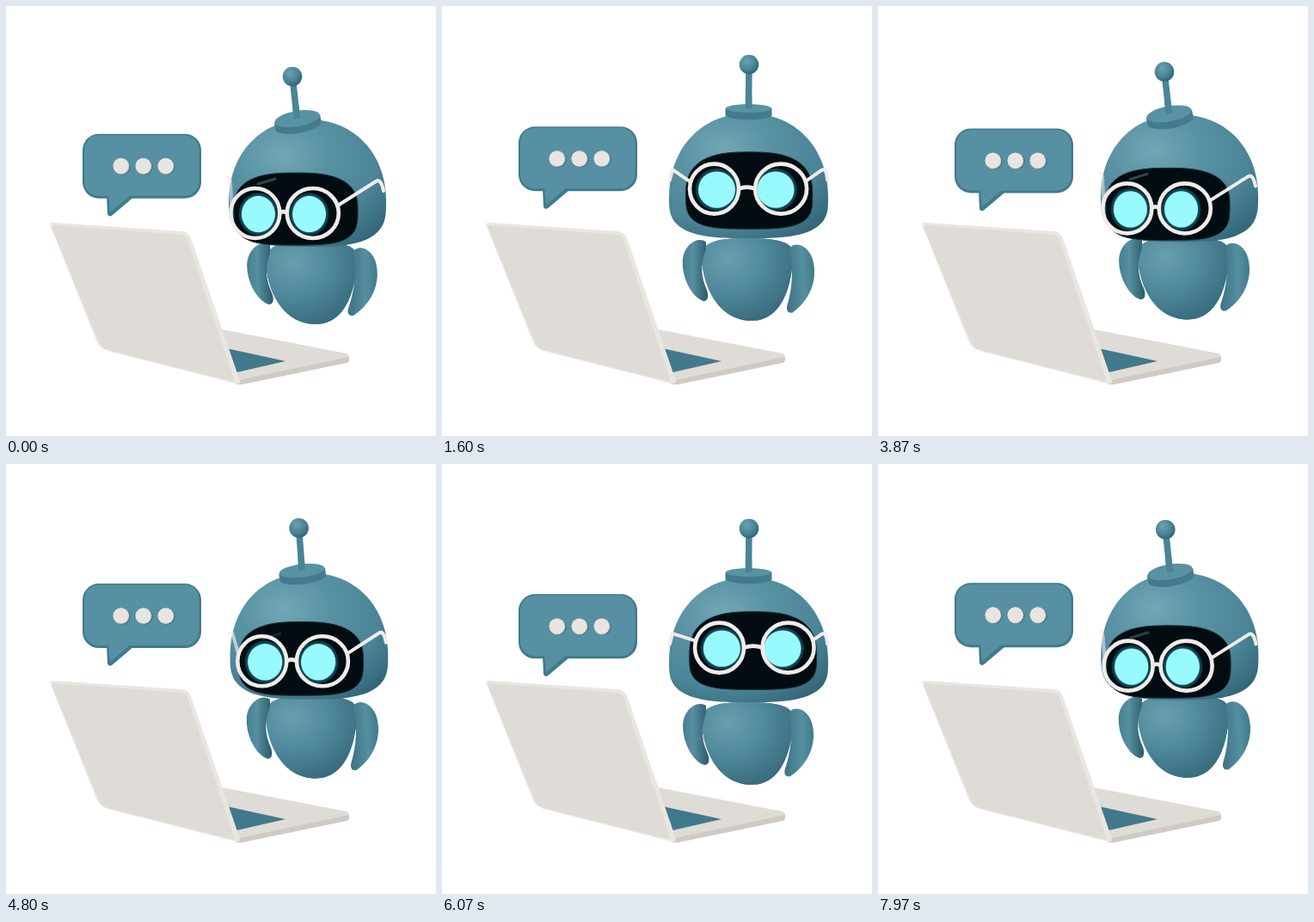
An HTML page for the animation above (8.01 s loop, 500 px wide and 500 px high).

```html
<!DOCTYPE html>
<html lang="en">
<head>
<meta charset="utf-8">
<title>Robot with laptop</title>
<style>
  html, body { margin: 0; width: 100%; height: 100%; overflow: hidden; background: #fff; }
  svg { display: block; width: 100vw; height: 100vh; }
  .frame { fill: none; stroke: #efecea; stroke-width: 4.6; stroke-linecap: round; stroke-linejoin: round; }
  .thin { stroke-width: 4; }
</style>
</head>
<body>
<svg viewBox="0 0 500 500">
  <defs>
    <radialGradient id="skin" cx=".34" cy=".28" r=".85">
      <stop offset="0" stop-color="#72a7b5"/>
      <stop offset=".35" stop-color="#5892a3"/>
      <stop offset=".72" stop-color="#4a8496"/>
      <stop offset="1" stop-color="#346678"/>
    </radialGradient>
    <radialGradient id="belly" cx=".3" cy=".25" r=".8">
      <stop offset="0" stop-color="#699fae"/>
      <stop offset=".5" stop-color="#4f899b"/>
      <stop offset="1" stop-color="#386c7e"/>
    </radialGradient>
    <linearGradient id="neck" x1="0" y1="0" x2="0" y2="1">
      <stop offset="0" stop-color="#173540" stop-opacity=".75"/>
      <stop offset=".16" stop-color="#173540" stop-opacity="0"/>
    </linearGradient>
    <linearGradient id="armL">
      <stop offset="0" stop-color="#467f91"/>
      <stop offset=".4" stop-color="#558fa0"/>
      <stop offset="1" stop-color="#2c5a6a"/>
    </linearGradient>
    <linearGradient id="armR">
      <stop offset="0" stop-color="#3d7284"/>
      <stop offset=".6" stop-color="#558fa0"/>
      <stop offset="1" stop-color="#427a8c"/>
    </linearGradient>
    <radialGradient id="knob" cx=".38" cy=".32" r=".7">
      <stop offset="0" stop-color="#6ba2b1"/>
      <stop offset=".6" stop-color="#4a8496"/>
      <stop offset="1" stop-color="#326476"/>
    </radialGradient>
    <radialGradient id="glow">
      <stop offset=".78" stop-color="#1d6878"/>
      <stop offset="1" stop-color="#0b2a35"/>
    </radialGradient>
  </defs>

  <g id="bubble">
    <g fill="#3f7b8e">
      <rect x="89" y="149" width="138" height="75" rx="19"/>
      <path d="M117 220L118 242Q119 246 123 244L149 222Z"/>
    </g>
    <g fill="#5790a2">
      <rect x="91" y="150.5" width="133.5" height="70.5" rx="17"/>
      <path d="M119 219L121 240L146 219Z"/>
    </g>
    <g id="dots"></g>
  </g>

  <g id="torso">
    <path id="trunk" fill="url(#belly)" d="M302 292C303 277 318 272 355 272C392 272 408 277 408 290C408 318 399 368 360 368C320 368 302 325 302 292Z"/>
    <use href="#trunk" style="fill:url(#neck)"/>
    <path id="shade" fill="url(#neck)" d="M302 292C303 277 318 272 355 272C392 272 408 277 408 290C408 318 399 368 360 368C320 368 302 325 302 292Z"/>
    <path id="left" fill="url(#armL)" d="M307 276C296 269 280 281 280 300C280 321 293 342 305 345C310 345 311 340 309 333C302 317 300 304 307 285Z"/>
    <path id="right" fill="url(#armR)" d="M404 283C410 276 423 279 429 293C437 315 428 343 404 358C398 359 396 354 399 347C405 329 408 309 404 283Z"/>
  </g>

  <g id="head">
    <path id="rod" stroke="#4a8496" stroke-width="7.5"/>
    <circle id="ball" r="11.3" fill="url(#knob)"/>
    <path id="dome" fill="url(#skin)"/>
    <path id="rim" fill="#437b8d"/>
    <ellipse id="top" rx="26.5" fill="#5992a3"/>
    <path id="stub" stroke="#4a8496" stroke-width="7.5"/>
    <path id="visor" fill="#030d11" stroke="#122d36"/>
    <path id="glint" stroke="#4c5a60" stroke-width="3" stroke-linecap="round"/>
    <g id="eyes"></g>
    <path id="side" class="frame thin"/>
    <g id="rings"></g>
    <path id="bridge" class="frame"/>
    <path id="temple" class="frame thin"/>
  </g>

  <g id="laptop">
    <path fill="#dfdbd6" d="M240 374L396 404Q400 406 399 411L272 438L240 424Z"/>
    <path fill="#cfcac4" d="M266 436L399 408V412Q399 414 396 415L275 440Q270 441 266 439Z"/>
    <path fill="#41798c" d="M256 398L325 413L268 426Z"/>
    <path fill="#e9e6e2" d="M51 254Q52 251 57 252L205 262Q212 263 215 270L271 433Q274 440 267 439L118 401Q109 398 106 391Z"/>
    <path fill="#dfdbd7" d="M53 257Q54 255 58 255L203 266Q209 266 211 272L265 433Q266 437 262 436L119 400Q111 398 108 391Z"/>
  </g>
</svg>

<script>
const LOOP = 8010;
const NS = "http://www.w3.org/2000/svg";
const $ = id => document.getElementById(id);
const set = (el, attrs) => { for (const key in attrs) el.setAttribute(key, attrs[key]); };
const add = (parent, tag, attrs) => {
  const el = document.createElementNS(NS, tag);
  set(el, attrs);
  return parent.appendChild(el);
};
const mix = (a, b, k) => a + (b - a) * k;
const clamp = u => Math.max(0, Math.min(1, u));
const smooth = u => u * u * (3 - 2 * u);
const wave = (t, low, period) => -Math.cos((t - low) / period * 2 * Math.PI);

// Superellipse with its own height and roundness above and below the centre.
function blob(x, y, rx, up, down, roundUp, roundDown) {
  const points = [];
  for (let i = 0; i < 120; i++) {
    const a = i / 120 * 2 * Math.PI, c = Math.cos(a), s = Math.sin(a);
    const [h, n] = s < 0 ? [up, roundUp] : [down, roundDown];
    const r = (Math.abs(c) ** n + Math.abs(s) ** n) ** (-1 / n);
    points.push(`${(x + rx * r * c).toFixed(2)} ${(y + h * r * s).toFixed(2)}`);
  }
  return `M${points.join("L")}Z`;
}

// The head swings between the laptop (1) and the viewer (REST), centred on these times.
const REST = -.3, TURN = 1000;
const TURNS = [1375, 3250, 4980, 6600, 8350];
const turnAt = t => TURNS.reduce((k, mid, i) => {
  const dir = i % 2 ? 1 : -1;
  return k + dir * (1 - REST) * smooth(clamp((t - mid) / TURN + .5));
}, 1);

const pair = make => [make(), make()];
const halos = pair(() => add($("eyes"), "ellipse", { fill: "url(#glow)" }));
const lights = pair(() => add($("eyes"), "ellipse", { fill: "#98fafd" }));
const rings = pair(() => add($("rings"), "ellipse", { class: "frame" }));
const dots = [0, 1, 2].map(() => {
  const g = add($("dots"), "g", {});
  add(g, "circle", { cx: 2, cy: -8.5, r: 9.3, fill: "#437a8c" });
  add(g, "circle", { cx: .4, cy: -9.3, r: 9.4, fill: "#d6d1cb" });
  add(g, "circle", { cy: -9.7, r: 8.8, fill: "#e8e5e1" });
  return g;
});

function drawHead(k, bob) {
  const body = clamp(k);
  const turn = (a, b) => mix(a, b, body);
  const face = (x, y, depth = 0) => [x - k * (30 + .13 * (x - 352) + depth), y + k * 25];
  set($("head"), { transform: `translate(0 ${bob - 367 - 2 * body})` });

  const bx = turn(357, 333), by = turn(69, 81);
  const cx = turn(356.5, 338.5), cy = turn(120, 130), ry = turn(5, 9);
  const tilt = `translate(${cx} ${cy}) rotate(${-10 * body})`;
  set($("ball"), { cx: bx, cy: by });
  set($("rod"), { d: `M${bx} ${by}L${cx} ${cy}` });
  set($("stub"), { d: `M${mix(bx, cx, .7)} ${mix(by, cy, .7)}L${cx} ${cy}` });
  set($("top"), { ry, transform: tilt });
  set($("rim"), { d: `M-27 0V8A27 ${ry} 0 0 0 27 8V0Z`, transform: tilt });
  set($("dome"), {
    d: blob(turn(356.5, 350.5), turn(225, 228), turn(92.5, 91.5), turn(99, 97), turn(46, 51), 2.15, 3)
  });
  set($("visor"), {
    d: blob(mix(356, 337, k), mix(222, 236, k), mix(73.5, 72, k), mix(50, 43, k), mix(39, 41, k), 2.7, 3.4)
  });
  set($("glint"), { d: `M${turn(312, 293)} 206l20 -6`, opacity: body * body * .7 });

  const [left, right] = [318, 386].map((x, i) => {
    const [ex, ey] = face(x, 216, -1);
    set(halos[i], { cx: ex, cy: ey, rx: turn(25, 23), ry: 25 });
    set(lights[i], { cx: ex, cy: ey, rx: turn(21.5, 19.5), ry: 21.2 });
    const [x0, y0] = face(315 + 77 * i, 215);
    const rx = 28.5 + 1.5 * i;
    set(rings[i], { cx: x0, cy: y0, rx, ry: 29 });
    return { x: x0, y: y0, rx };
  });

  const x1 = left.x + left.rx, x2 = right.x - right.rx;
  set($("bridge"), { d: `M${x1} ${left.y}Q${(x1 + x2) / 2} ${left.y - 4} ${x2} ${left.y}` });
  set($("side"), {
    d: `M${left.x - left.rx + 1} ${left.y - 8}L${turn(268, 261)} ${turn(191, 203)}l-3 ${turn(12, -5)}`,
    opacity: 1 - body * .45
  });
  const hx = turn(441, 430), hy = turn(192, 203);
  set($("temple"), {
    d: `M${right.x + right.rx - 1} ${right.y - 9}L${hx} ${hy}q6 -4 ${turn(7, 9)} 11`
  });
}

function draw(t) {
  const bob = 368.2 + 5.2 * wave(t, 1000, 3260);
  set($("torso"), { transform: `translate(0 ${bob - 368})` });
  const swing = -1.6 * wave(t, 200, 3200);
  set($("left"), { transform: `rotate(${-swing * .5} 300 280)` });
  set($("right"), { transform: `rotate(${swing - 1.4} 412 286)` });
  drawHead(turnAt(t), bob);

  set($("bubble"), { transform: `translate(0 ${-4.2 + 6.7 * wave(t, 1170, 3340)})` });
  dots.forEach((dot, i) => {
    const peak = 7030 - 120 * (2 - i);
    const squash = 1 - .63 * Math.sin(clamp(1 - Math.abs(t - peak) / 100) * Math.PI / 2);
    set(dot, { transform: `translate(${133.5 + 26 * i} 195.8) scale(1 ${squash})` });
  });
}

$("shade").remove();
const start = performance.now();
function tick() {
  draw((performance.now() - start) % LOOP);
  requestAnimationFrame(tick);
}
tick();
</script>
</body>
</html>
```
